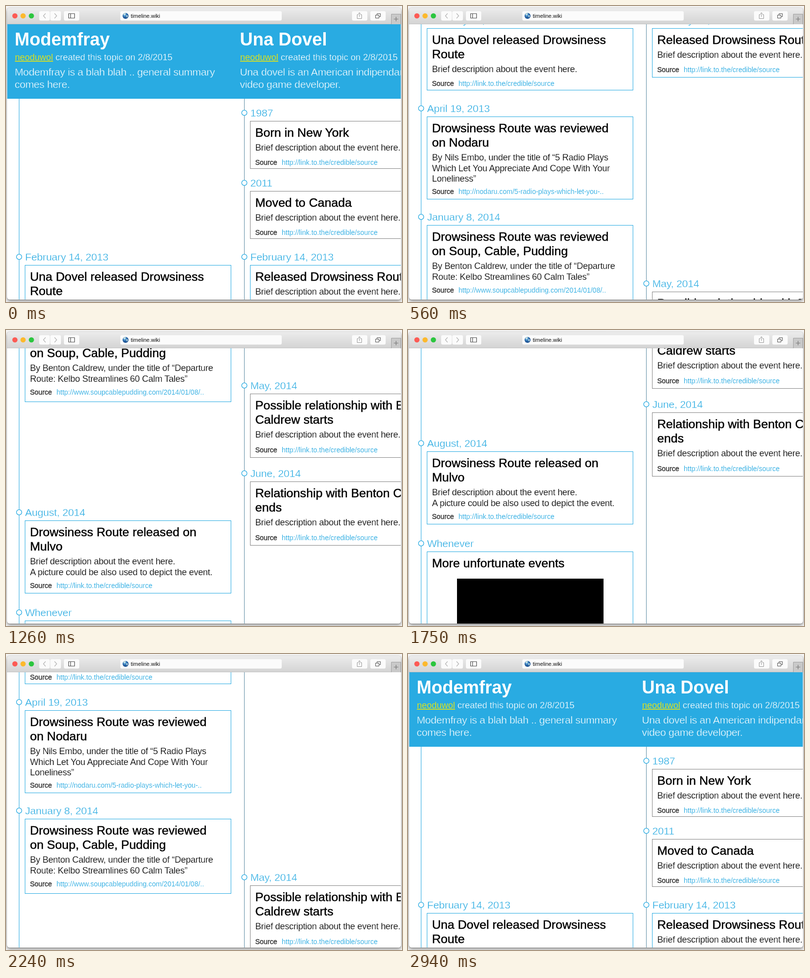
An HTML page that plays this animation: 800x600 px, repeating every 3570 ms.

```html
<!DOCTYPE html>
<html lang="en">
<head>
<meta charset="utf-8">
<title>timeline.wiki</title>
<style>
  html, body { margin: 0; width: 100%; height: 100%; overflow: hidden; background: #f6f6f6; }
  .window {
    position: absolute; left: 2px; top: 4px; width: 796px; height: 591px;
    border-radius: 5px; background: #fff;
    box-shadow: 0 0 1px rgba(0,0,0,.45), 0 3px 6px rgba(0,0,0,.45);
  }
  svg { position: absolute; left: 0; top: 0; display: block; }
  text { font-family: "Liberation Sans", Arial, sans-serif; white-space: pre; }
  /* a stroke in the background colour makes the letters lighter */
  .head { font-size: 36px; font-weight: bold; fill: #fff; }
  .by { font-size: 18px; fill: #fff; stroke: #29abe2; stroke-width: .3px; }
  .by .user { fill: #d9e021; stroke: none; text-decoration: underline; }
  .about { font-size: 21px; letter-spacing: -.37px; fill: #fff; stroke: #29abe2; stroke-width: .45px; }
  .date { font-size: 21px; letter-spacing: -.2px; fill: #29abe2; stroke: #fff; stroke-width: .4px; }
  .title { font-size: 24.7px; fill: #000; stroke: #000; stroke-width: .45px; }
  .body { font-size: 18px; letter-spacing: -.28px; fill: #000; stroke: #fff; stroke-width: .25px; }
  .label { font-size: 14px; fill: #333; stroke: #333; stroke-width: .4px; }
  .link { font-size: 14px; fill: #29abe2; stroke: #fff; stroke-width: .15px; }
  .address { font-size: 11px; fill: #111; }
</style>
</head>
<body>
<div class="window"></div>
<svg width="800" height="600" viewBox="0 0 800 600">
  <defs>
    <linearGradient id="bar" x2="0" y2="1">
      <stop offset="0" stop-color="#ececec"/><stop offset="1" stop-color="#d3d3d3"/>
    </linearGradient>
    <radialGradient id="globe" cx=".4" cy=".35">
      <stop offset="0" stop-color="#6fb9ee"/><stop offset="1" stop-color="#174f92"/>
    </radialGradient>
    <clipPath id="view"><path d="M2.5 37H797.5V590a5 5 0 0 1-5 5H7.5a5 5 0 0 1-5-5Z"/></clipPath>
  </defs>

  <g clip-path="url(#view)"><g id="page"></g></g>

  <path d="M2 37V9a5 5 0 0 1 5-5H793a5 5 0 0 1 5 5V37Z" fill="url(#bar)"/>
  <path d="M2 36.5H798" stroke="#c4c4c4"/>
  <circle cx="18" cy="20" r="5.3" fill="#fc5b55"/>
  <circle cx="34.5" cy="20" r="5.3" fill="#fcb92d"/>
  <circle cx="51.3" cy="20" r="5.3" fill="#2cc63f"/>
  <g id="buttons" fill="#fbfbfb"></g>
  <g fill="none" stroke="#b4b4b4" stroke-width="1.2">
    <path d="M80 15l-4.5 5 4.5 5M98 15l4.5 5-4.5 5"/>
    <g stroke="#555">
      <path d="M126.5 15.5h12v9h-12zM130.5 15.5v9"/>
      <path d="M746.5 18.5h7v6h-7zM749.5 18v-2.5h7v6h-2.5" stroke-width="1"/>
    </g>
    <path d="M712 17.5h-2.5v8h9v-8h-2.5M714 22v-8.5M711.5 16l2.5-2.5 2.5 2.5" stroke="#999" stroke-width="1"/>
  </g>
  <circle cx="241.5" cy="20" r="6" fill="url(#globe)"/>
  <path d="M237 17q3-4 5-2q0 3-3 4zM243 19q4-1 3 2l-2 3z" fill="#d8efe6" opacity=".85"/>
  <text class="address" x="252" y="24">timeline.wiki</text>
  <path d="M778.5 37V16.5H797.5V37" fill="#c9c9c9" stroke="#a2a2a2"/>
  <path d="M783.5 26.5h9M788 22v9" stroke="#777" stroke-width="1.2"/>
</svg>

<script>
const BLUE = '#29abe2', GREY = '#858585';
const page = document.getElementById('page');

function add(parent, tag, attrs, content) {
  const el = document.createElementNS('http://www.w3.org/2000/svg', tag);
  for (const key in attrs) el.setAttribute(key, attrs[key]);
  if (content) el.textContent = content;
  parent.appendChild(el);
  return el;
}
const rect = (parent, x, y, width, height, more) =>
  add(parent, 'rect', { x, y, width, height, ...more });
const text = (x, y, style, content) => add(page, 'text', { x, y, class: style }, content);

// toolbar buttons and address field: left edge, width
const buttons = document.getElementById('buttons');
[[67, 21.5], [89.5, 21.5], [117, 31], [231, 326], [699, 31], [736, 31]]
  .forEach(([x, w]) => rect(buttons, x, 10.5, w, 19, { rx: 3 }));

const user = 'neoduwol', game = 'Drowsiness Route';
const brief = 'Brief description about the event here.';
const site = 'http://link.to.the/credible/source';

// Each event: y of its dot, date, title lines, body lines,
// offsets of the link row and of the card's end, link, border
const columns = [
  {
    x: 0, line: BLUE, head: 'Modemfray',
    about: ['Modemfray is a blah blah .. general summary', 'comes here.'],
    events: [
      [508, 'February 14, 2013', ['Una Dovel released Drowsiness', 'Route'], [brief], 134, 142, site, BLUE],
      [687, 'April 19, 2013', [game + ' was reviewed', 'on Nodaru'],
        ['By Nils Embo, under the title of “5 Radio Plays',
         'Which Let You Appreciate And Cope With Your', 'Loneliness”'],
        174, 184, 'http://nodaru.com/5-radio-plays-which-let-you-..', BLUE],
      [907, 'January 8, 2014', [game + ' was reviewed', 'on Soup, Cable, Pudding'],
        ['By Benton Caldrew, under the title of “Departure',
         'Route: Kelbo Streamlines 60 Calm Tales”'],
        154, 168, 'http://www.soupcablepudding.com/2014/01/08/..', BLUE],
      [1299, 'August, 2014', [game + ' released on', 'Mulvo'],
        [brief, 'A picture could be also used to depict the event.'], 154, 164, site, BLUE],
      [1502, 'Whenever', ['More unfortunate events'], [], 0, 420, '', BLUE],
    ],
  },
  {
    x: 455, line: '#5f8ea5', head: 'Una Dovel',
    about: ['Una dovel is an American indipendant', 'video game developer.'],
    events: [
      [216, '1987', ['Born in New York'], [brief], 106, 113, site, GREY],
      [358, '2011', ['Moved to Canada'], [brief], 106, 113, site, GREY],
      [508, 'February 14, 2013', ['Released ' + game], [brief], 106, 116, site, BLUE],
      [1042, 'May, 2014', ['Possible relationship with Benton', 'Caldrew starts'], [brief], 136, 146, site, GREY],
      [1220, 'June, 2014', ['Relationship with Benton Caldrew', 'ends'], [brief], 136, 146, site, GREY],
    ],
  },
];

function drawEvent(x, [y, date, title, body, linkRow, end, link, border]) {
  rect(page, x + 38.5, y + 17.5, 416, end - 17, { fill: '#fff', stroke: border });
  add(page, 'circle', { cx: x + 26.5, cy: y + .5, r: 5.3, fill: '#fff', stroke: BLUE, 'stroke-width': 1.3 });
  text(x + 38.5, y + 8, 'date', date);
  title.forEach((s, i) => text(x + 48.5, y + 49 + 29 * i, 'title', s));
  const top = y + 48 + 29 * title.length;
  body.forEach((s, i) => text(x + 48.5, top + 21.7 * i, 'body', s));
  if (link) {
    text(x + 48.5, y + linkRow, 'label', 'Source');
    text(x + 102, y + linkRow, 'link', link);
  }
}

rect(page, 0, 37, 800, 151, { fill: BLUE });
for (const { x, line, head, about, events } of columns) {
  text(x + 17.5, 79.5, 'head', head);
  const by = text(x + 18, 110, 'by');
  add(by, 'tspan', { class: 'user' }, user);
  add(by, 'tspan', {}, ' created this topic on 2/8/2015');
  about.forEach((s, i) => text(x + 17.5, 141 + 25 * i, 'about', s));
  rect(page, x + 26, 188, 1, 1800, { fill: line });
  events.forEach(event => drawEvent(x, event));
}
rect(page, 99, 1574, 296, 296, { fill: '#000' });

// Scroll distance of every step: a swing down, a slow stop, a quick return
const STEP = 70, LOOP = 3570;
const moves = [
  10, 30, 50, 70, 80, 80, 80, 80,
  70, 60, 60, 50, 50, 40, 30, 30, 30, 30,
  30, 30, 20, 20, 20, 10, 10,
  -20, -40, -60, -70, -90, -100, -100,
  -110, -110, -100, -90, -70, -50,
  -30, -10, -10, -10,
];
const stops = [0];
moves.forEach((d, i) => stops.push(stops[i] + d));

function draw() {
  const step = Math.floor(performance.now() % LOOP / STEP);
  const scroll = stops[Math.min(step, moves.length)];
  page.setAttribute('transform', `translate(0 ${-scroll})`);
  requestAnimationFrame(draw);
}
draw();
</script>
</body>
</html>
```
